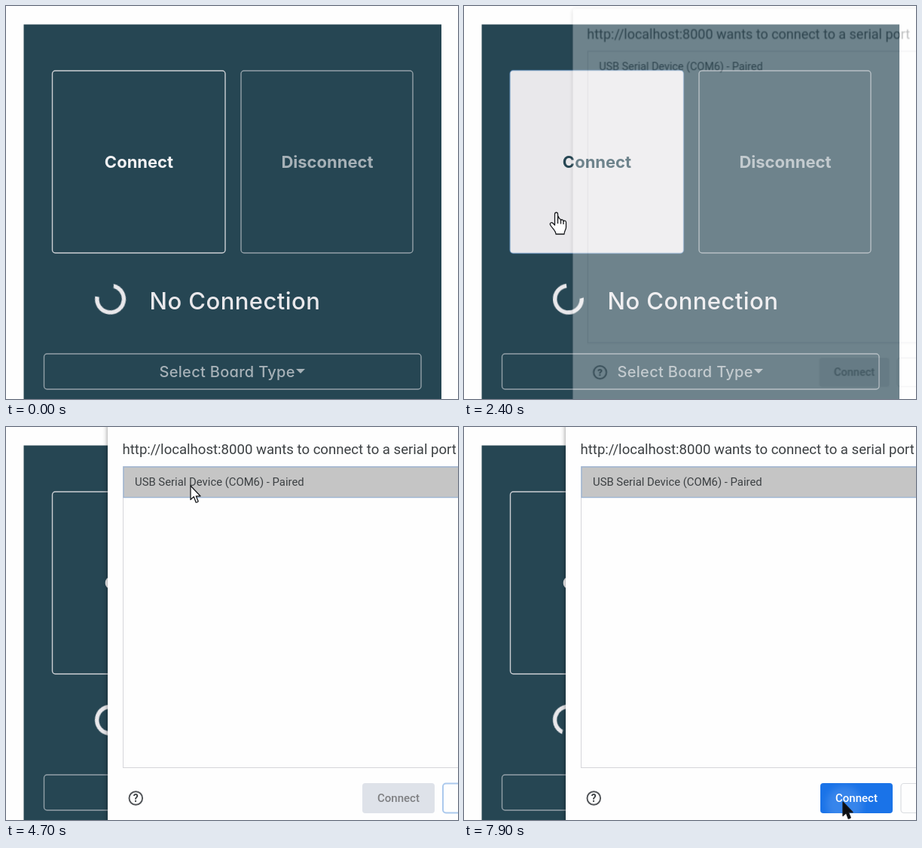
Recreate the animation shown at these times as an HTML page. Size 600 by 522 pixels, loop 8000 ms.

```html
<!DOCTYPE html>
<html lang="en">
<head>
<meta charset="utf-8">
<title>Serial port connection</title>
<style>
  :root { --teal: #264653; --light: #e9e8eb; --loop: 8s linear infinite; }
  html, body { margin: 0; width: 100%; height: 100%; overflow: hidden; background: #fefefe; }
  svg { display: block; width: 600px; height: 522px; }

  .panel { font-family: Inter, "Open Sans", sans-serif; font-feature-settings: "cv11"; fill: var(--light); text-anchor: middle; }
  .panel rect { fill: none; stroke: var(--light); stroke-width: 1.4; stroke-opacity: .85; }
  .panel .back { fill: var(--teal); stroke: none; }
  .big { font-size: 22px; font-weight: 700; }
  .status { font-size: 31px; font-weight: 450; letter-spacing: .45px; text-anchor: start; }
  .select { font-size: 20px; font-weight: 450; letter-spacing: .3px; text-anchor: start; }
  .dim { opacity: .66; }
  .panel .hover { fill: var(--light); animation: hoverFill var(--loop); }
  .hoverText { animation: hoverText var(--loop); }
  .panel .focus { stroke: #4b83bd; animation: focus 8s step-end infinite; }
  .spinner {
    fill: none; stroke: var(--light); stroke-width: 5.4; stroke-dasharray: 2.95 1.05;
    transform-origin: 138.5px 389.2px; animation: spin var(--loop);
  }

  .dialog { font-family: Roboto, "Open Sans", sans-serif; fill: #3c4043; transform-origin: 430px 290px; animation: open var(--loop); }
  .sheet { fill: #fefefe; filter: drop-shadow(0 1px 3px rgba(0, 0, 0, .45)); }
  .title { font-size: 18.58px; }
  .item { font-size: 14.85px; }
  .label { font-size: 15px; font-weight: 500; text-anchor: middle; animation: label var(--loop); }
  .list { fill: none; stroke: #d6d6da; }
  .row { fill: #c5c5c5; stroke: #9db5d3; stroke-width: 1.4; animation: picked 8s step-end infinite; }
  .ok { animation: ok var(--loop); }
  .cancel { fill: #fefefe; animation: cancel var(--loop); }
  .ripple { fill: #fff; animation: ripple var(--loop); }

  .cursor { animation: travel var(--loop); }
  .cursor path { fill: #fff; stroke: #17191c; stroke-width: 1.3; stroke-linejoin: round; }
  .hand { animation: hand 8s step-end infinite; }
  .arrow { animation: arrow 8s step-end infinite; }
  .cursor .arrow path { animation: press 8s step-end infinite; }

  @keyframes spin { from { transform: rotate(-76deg); } to { transform: rotate(3764deg); } }
  @keyframes hoverFill {
    0%, 16.9% { fill-opacity: 0; }
    18.8%, 39.4% { fill-opacity: 1; }
    41.3%, 100% { fill-opacity: 0; }
  }
  @keyframes hoverText {
    0%, 16.9% { fill: #f3f2f4; }
    18.8%, 39.4% { fill: var(--teal); }
    41.3%, 100% { fill: #f3f2f4; }
  }
  @keyframes focus { 0% { opacity: 0; } 27.5% { opacity: .6; } 32.5%, 100% { opacity: 0; } }
  @keyframes open {
    0%, 28.75% { opacity: 0; transform: scale(.95); }
    30% { opacity: .33; transform: scale(.968); }
    31.25% { opacity: .8; transform: scale(.988); }
    32.5%, 100% { opacity: 1; transform: none; }
  }
  @keyframes picked { 0% { opacity: 0; } 58.75%, 100% { opacity: 1; } }
  @keyframes ok { 0%, 58.7% { fill: #e8e8e9; } 60%, 100% { fill: #1a73e8; } }
  @keyframes label { 0%, 58.7% { fill: #77797c; } 60%, 100% { fill: #fff; } }
  @keyframes cancel {
    0%, 31% { stroke: #dadce0; stroke-width: 1.2; }
    32.5%, 58.7% { stroke: #a9c8ee; stroke-width: 2; }
    60%, 100% { stroke: #dadce0; stroke-width: 1.2; }
  }
  @keyframes ripple {
    0%, 97% { opacity: 0; r: 6px; }
    98.75%, 100% { opacity: .13; r: 24px; }
  }
  @keyframes travel {
    0%, 13.75% { transform: translate(410px, 418px); }
    16.25% { transform: translate(260px, 345px); }
    18.2%, 39.4% { transform: translate(122px, 275px); }
    43% { transform: translate(190px, 140px); }
    46.5%, 62.5% { transform: translate(245px, 78px); }
    66% { transform: translate(315px, 185px); }
    70%, 71% { transform: translate(411px, 318px); }
    77.5% { transform: translate(497px, 488px); }
    84%, 100% { transform: translate(503px, 498px); }
  }
  @keyframes hand { 0% { opacity: 0; } 16.9% { opacity: 1; } 39.4%, 100% { opacity: 0; } }
  @keyframes arrow { 0% { opacity: 0; } 13.7% { opacity: 1; } 16.9% { opacity: 0; } 39.4%, 100% { opacity: 1; } }
  @keyframes press { 0% { fill: #fff; } 91.2%, 100% { fill: #0c0e11; } }
</style>
</head>
<body>
<svg viewBox="0 0 600 522">
  <defs>
    <clipPath id="okShape"><rect x="473" y="473" width="96" height="40" rx="4"/></clipPath>
    <filter id="soft"><feGaussianBlur stdDeviation="5"/></filter>
  </defs>

  <g class="panel">
    <rect class="back" x="23.5" y="24.5" width="554.5" height="510"/>
    <rect class="hover" x="61.500" y="86" width="229.500" height="242" rx="4"/>
    <rect class="focus" x="61" y="85.5" width="230.5" height="243" rx="4"/>
    <text class="big hoverText" x="176.5" y="215">Connect</text>
    <g class="dim">
      <rect x="312" y="86" width="228" height="242" rx="4"/>
      <text class="big" x="426.5" y="215">Disconnect</text>
      <rect x="50.5" y="462" width="500.5" height="47" rx="4"/>
      <text class="select" x="203.5" y="493">Select Board Type</text>
      <path d="M385 482h12l-6 6z"/>
    </g>
    <circle class="spinner" cx="138.5" cy="389.2" r="17.8" pathLength="4"/>
    <text class="status" x="190.5" y="403">No Connection</text>
  </g>

  <g class="dialog">
    <rect class="sheet" x="135" y="-6" width="540" height="622" rx="3"/>
    <text class="title" x="154.5" y="36">http://localhost:8000 wants to connect to a serial port</text>
    <rect class="list" x="155.5" y="52.5" width="500" height="400"/>
    <rect class="row" x="156" y="53" width="499" height="40.5"/>
    <text class="item" x="171" y="78">USB Serial Device (COM6) - Paired</text>
    <circle cx="172.3" cy="493" r="8.8" fill="none" stroke="#505357" stroke-width="1.9"/>
    <text x="172.3" y="498" font-size="14" font-weight="700" text-anchor="middle">?</text>
    <rect class="ok" x="473" y="473" width="96" height="40" rx="4"/>
    <g clip-path="url(#okShape)"><circle class="ripple" cx="505" cy="501" r="6" filter="url(#soft)"/></g>
    <text class="label" x="521" y="498">Connect</text>
    <rect class="cancel" x="580" y="473.5" width="76" height="39" rx="4"/>
  </g>

  <g class="cursor">
    <g class="hand">
      <path d="M-1.5 1.5C-1.5-1.5 2.5-1.5 2.5 1.5V9C3-.5 3 7 5 7.5Q6.5 8 6.5 10C7 8 10 8.5 10 11C11 9.5 13.5 10 13.5 12.5V19C13.5 22 11 24 11 28H0C0 24-4 21-7 16.5C-9 13.5-6 11.5-4 13.5L-1.5 16Z"/>
      <path d="M2.5 8V14M6.5 9.5V14.5M10 11V15"/>
    </g>
    <g class="arrow"><path d="M0 0V18.5L4.3 14.6L7.2 22.2Q9.5 22.3 10.2 20.8L7.3 13.8H13Z"/></g>
  </g>
</svg>
</body>
</html>
```
